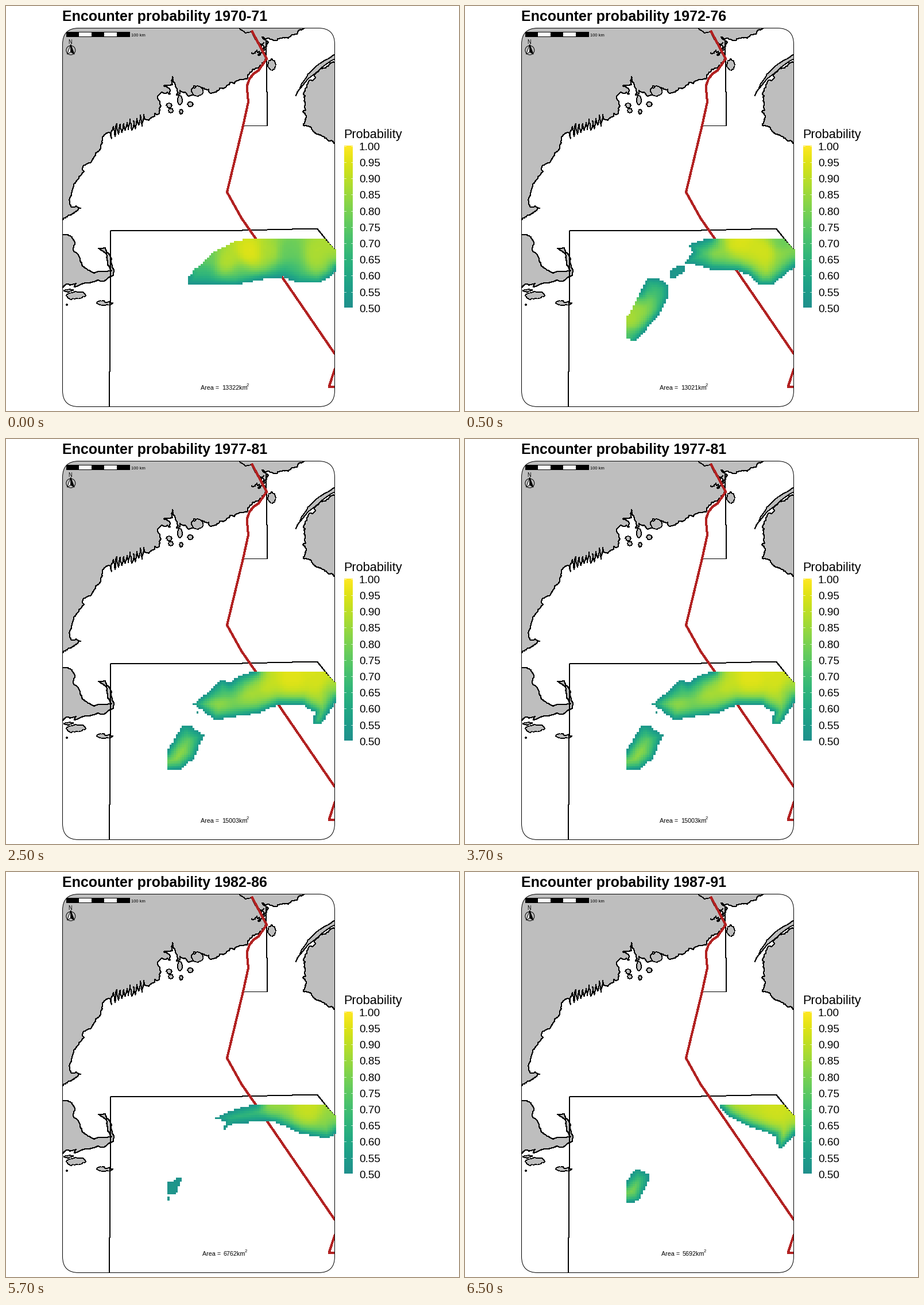
A matplotlib script that plays this animation: 789 px wide and 705 px high, repeating every 8 s.

```python
import numpy as np
import matplotlib.pyplot as plt
from matplotlib.animation import FuncAnimation
from matplotlib.patches import Circle, FancyBboxPatch, Polygon, Rectangle
from matplotlib.path import Path

W, H, DPI = 789, 705, 64
PX = 72 / DPI                      # points per pixel
LAND, ROUTE = "#bebebe", "#b22222"
COLS, ROWS = 81, 52
LEFT, TOP, RIGHT = 281, 405, 575
CELL = (RIGHT - LEFT) / COLS

plt.rcParams["font.family"] = "Liberation Sans"
rng = np.random.default_rng(7)

fig = plt.figure(figsize=(W / DPI, H / DPI), dpi=DPI, facecolor="white")
ax = fig.add_axes([0, 0, 1, 1])
ax.axis("off")

panel = FancyBboxPatch((98.5, 38.5), 474, 659, boxstyle="round,pad=0,rounding_size=28",
                       fc="none", ec="black", lw=PX, zorder=5)
ax.add_patch(panel)


def rough(points, amp, depth=3):
    """Jagged version of a polyline by midpoint displacement."""
    p = np.array(points, float)
    for _ in range(depth):
        d = np.diff(p, axis=0)
        normal = np.column_stack([-d[:, 1], d[:, 0]])
        mid = (p[:-1] + p[1:]) / 2 + normal * rng.normal(0, amp, (len(d), 1))
        out = np.empty((2 * len(p) - 1, 2))
        out[::2], out[1::2] = p, mid
        p = out
    return p


def shape(points, fc=LAND, ec="black", lw=1, aa=False, zorder=1):
    artist = Polygon(points, fc=fc, ec=ec, lw=lw * PX, antialiased=aa, zorder=zorder)
    ax.add_patch(artist)
    artist.set_clip_path(panel)


def island(cx, cy, rx, ry, lean=0):
    t = np.linspace(0, 2 * np.pi, 9)
    x, y = rx * np.cos(t), ry * np.sin(t)
    shape(rough(np.column_stack([cx + x + lean * y, cy + y]), 0.13, 2), lw=0.6)


def line(points, color="black", width=1, zorder=3):
    x, y = zip(*points)
    artist, = ax.plot(x, y, color=color, lw=width * PX, antialiased=False, zorder=zorder,
                      solid_joinstyle="round", solid_capstyle="butt")
    artist.set_clip_path(panel)


def text(x, y, s, size, **kw):
    return ax.text(x, y, s, fontsize=size * PX, va="baseline", zorder=8, **kw)


# Mainland
east = [(518, 30), (517, 40), (498, 50), (483, 55), (468, 60), (453, 57), (446, 54),
        (448, 74), (452, 91), (440, 107), (425, 115), (408, 128), (385, 138), (372, 143),
        (357, 152), (345, 143)]
middle = [(345, 143), (327, 139), (318, 157), (303, 147), (297, 155), (295, 138),
          (290, 123), (290, 137), (275, 139), (286, 153), (276, 152), (267, 178),
          (267, 187), (241, 197)]
west = [(182, 221), (168, 228), (165, 248), (150, 268), (133, 283), (132, 293),
        (118, 313), (110, 338), (113, 349), (130, 352), (109, 364), (98, 373)]
n = 20
reach = np.where(np.arange(n) % 2, 10, -9) * rng.uniform(0.5, 1.2, n)
fingers = np.column_stack([np.linspace(240, 184, n), np.linspace(197, 219, n) + reach])
shape(np.vstack([rough(east, 0.2), rough(middle, 0.18), rough(fingers, 0.06, 2),
                 rough(west, 0.12), [(90, 376), (90, 30)]]))

cape = [(98, 398), (112, 400), (120, 412), (117, 425), (126, 433), (133, 453), (153, 465),
        (184, 461), (177, 450), (174, 430), (161, 422), (173, 421), (181, 434), (188, 460),
        (187, 469), (160, 477), (119, 489), (122, 483), (105, 484), (98, 491)]
shape(np.vstack([rough(cape, 0.08), [(90, 491), (90, 398)]]))

neck = [(580, 80), (540, 105), (515, 135), (505, 156), (520, 134), (545, 112), (580, 88)]
shape(rough(neck, 0.03), lw=0.7)
peninsula = [(580, 88), (549, 109), (529, 129), (518, 153), (517, 184), (522, 196),
             (518, 207), (532, 214), (540, 222), (552, 227), (573, 252), (580, 255)]
shape(rough(peninsula, 0.17, 4))

for spec in [(463, 102, 7, 10, 0.1), (122, 504, 17, 6, -0.4), (172, 517, 14, 4, 0.3),
             (109, 495, 8, 2, -1.5), (106, 520, 1, 1), (333, 148, 10, 9), (303, 164, 4, 8),
             (284, 173, 5, 4), (287, 182, 4, 4), (305, 184, 3, 4), (321, 171, 5, 4)]:
    island(*spec)

# Tidal inlets and the upper river
shape(rough([(444, 66), (449, 64), (452, 75), (447, 80), (444, 66)], 0.25, 2), "white")
line(rough([(428, 81), (437, 77), (439, 85), (445, 81)], 0.4), zorder=2)
line(rough([(406, 38), (417, 47), (428, 45), (444, 70)], 0.12, 2), width=0.7, zorder=2)

# Management areas and the boundary route
line([(453, 61), (455.5, 208.5), (413, 208.5)])
line([(180, 698), (182.5, 391.5), (390, 391), (542, 387.5), (573, 426)])
line([(428, 43), (454, 92), (449, 99), (440, 112), (431, 118), (424, 127), (419.5, 140),
      (422, 167), (413, 208), (385, 324), (410, 369), (435, 405), (573, 606)], ROUTE, 3, 4)
line([(573, 631), (562.5, 663), (573, 663)], ROUTE, 3, 4)

# Scale bar and north arrow
ax.add_patch(Rectangle((105, 45), 110, 8, fc="white", ec="black", lw=PX, aa=False, zorder=6))
for x in (105, 149, 193):
    ax.add_patch(Rectangle((x, 45), 22, 8, fc="black", lw=0, zorder=6))
text(218, 53, "100 km", 7.6)
text(108, 66, "N", 9.5)
ax.add_patch(Circle((112.8, 77), 8, fc="none", ec="black", lw=PX, zorder=6))
for side, fill in ((-6.3, "white"), (6.3, "black")):
    shape([(112.8, 67), (112.8 + side, 84), (112.8, 80)], fill, aa=True, zorder=6)

# Legend
viridis = plt.get_cmap("viridis")
ax.imshow(viridis(np.linspace(1, 0.5, 282))[:, None], extent=(589, 604, 525.5, 243.5),
          aspect="auto", interpolation="nearest", zorder=6)
text(588, 230, "Probability", 21.7)
for i in range(11):
    y = 243.8 + 28.2 * i
    for x in (589, 601):
        ax.plot([x, x + 3], [y, y], color="white", lw=0.7 * PX, zorder=7)
    text(615, y + 7, f"{1 - 0.05 * i:.2f}", 19)

# Probability surfaces
gx, gy = np.meshgrid(LEFT + CELL * (np.arange(COLS) + 0.5), TOP + CELL * (np.arange(ROWS) + 0.5))
cells = np.column_stack([gx.ravel(), gy.ravel()])
CORNER = [(576, 428), (554, 404)]


def distance(points, edge):
    """Distance from each point to the nearest segment of a polyline."""
    a, d = edge[:-1], np.diff(edge, axis=0)
    rel = points[:, None] - a
    t = np.clip((rel * d).sum(axis=2) / (d ** 2).sum(axis=1), 0, 1)
    return np.linalg.norm(rel - t[..., None] * d, axis=2).min(axis=1)


def patch(edge, peaks, width=18, cut=()):
    """Fill edge + cut; values climb from 0.51 at the edge to nearby peaks (x, y, p)."""
    edge, peaks = np.array(edge, float), np.array(peaks, float)
    inside = Path(np.vstack([edge, *[[c] for c in cut]])).contains_points(cells)
    pts = cells[inside]
    r2 = ((pts[:, None] - peaks[:, :2]) ** 2).sum(axis=2)
    weight = (r2 + 300) ** -2.0
    peak = weight @ peaks[:, 2] / weight.sum(axis=1)
    value = np.full(len(cells), np.nan)
    value[inside] = 0.51 + (peak - 0.51) * np.tanh(distance(pts, edge) / width)
    return value.reshape(ROWS, COLS)


def dot(x, y, rows=1):
    value = np.full((ROWS, COLS), np.nan)
    col, row = int((x - LEFT) / CELL), int((y - TOP) / CELL)
    value[row:row + rows, col] = 0.52
    return value


def surface(*parts):
    value = np.fmax.reduce(parts)
    rgba = viridis(np.nan_to_num(value))
    rgba[..., 3] = ~np.isnan(value)
    return rgba


s1970 = surface(patch(
    [(317, 474), (317, 484), (400, 486), (445, 476), (483, 472), (510, 483), (545, 483),
     (567, 470), (576, 458)],
    [(425, 430, .96), (385, 446, .9), (350, 440, .77), (345, 462, .68), (462, 428, .88),
     (488, 428, .76), (545, 432, .88), (490, 458, .7), (405, 466, .78)],
    16, CORNER + [(425, 404), (395, 411), (365, 426), (325, 462)]))

s1972 = surface(
    patch([(425, 404), (389, 416), (396, 428), (382, 450), (398, 449), (430, 459),
           (475, 461), (492, 467), (514, 486), (535, 486), (576, 453)],
          [(475, 412, .95), (520, 430, .94), (410, 428, .74), (440, 430, .85),
           (554, 408, .77), (560, 438, .85)], 18, CORNER),
    patch([(358, 473), (358, 459), (369, 453), (383, 453), (382, 462), (366, 474)],
          [(370, 463, .57)]),
    patch([(297, 585), (342, 532), (354, 505), (354, 486), (339, 475), (317, 474),
           (305, 498)],
          [(290, 550, .89), (305, 532, .86), (316, 510, .8), (328, 495, .68),
           (290, 573, .73)], 13, [(290, 530), (280, 541), (280, 578)]))

s1977 = surface(
    patch([(432, 404), (408, 411), (389, 425), (376, 418), (355, 438), (326, 461),
           (365, 489), (440, 477), (475, 462), (515, 462), (538, 476), (534, 497),
           (549, 497), (576, 455)],
          [(495, 418, .96), (540, 420, .94), (460, 425, .92), (425, 442, .88),
           (370, 463, .87), (375, 438, .73), (405, 425, .76), (568, 442, .87)], 16, CORNER),
    dot(332, 475),
    patch([(280, 577), (305, 574), (328, 555), (345, 515), (319, 498), (307, 498),
           (280, 545)],
          [(300, 545, .88), (312, 526, .82), (318, 510, .66)], 15))

s1982 = surface(
    patch([(433, 404), (393, 415), (364, 429), (383, 435), (376, 450), (395, 439),
           (450, 433), (470, 436), (513, 455), (562, 464), (576, 453)],
          [(525, 416, .92), (475, 412, .86), (420, 418, .72), (565, 432, .84)], 16, CORNER),
    dot(283, 568, 2),
    patch([(280, 562), (280, 542), (296, 536), (299, 529), (306, 535), (298, 555),
           (292, 562)], [(290, 550, .56)]))

s1987 = surface(
    patch([(440, 404), (460, 425), (490, 441), (540, 459), (546, 480), (553, 480),
           (576, 455)],
          [(540, 422, .93), (490, 412, .91), (565, 440, .91)], 14, CORNER),
    patch([(280, 577), (303, 572), (319, 541), (320, 526), (304, 517), (295, 518),
           (280, 541)], [(292, 548, .86), (304, 528, .7)], 15))

periods = [("1970-71", 13322, s1970), ("1972-76", 13021, s1972), ("1977-81", 15003, s1977),
           ("1982-86", 6762, s1982), ("1987-91", 5692, s1987)]

heat = ax.imshow(s1970, extent=(LEFT, RIGHT, TOP + ROWS * CELL, TOP),
                 aspect="auto", interpolation="nearest", zorder=7)
ax.set_xlim(0, W)
ax.set_ylim(H, 0)
title = text(98, 26, "", 25, weight="bold")
label = text(339, 668, "Area =", 10.7)
number = text(376, 668, "", 10.7)
square = text(419, 662, "2", 7.6)


def update(frame):
    years, area, rgba = periods[(frame + 3) // 4]
    inset = 0 if area >= 10000 else 3
    heat.set_data(rgba)
    title.set_text(f"Encounter probability {years}")
    number.set_text(f"{area}km")
    label.set_x(339 + inset)
    number.set_x(376 + inset)
    square.set_x(419 - inset)
    return heat, title, label, number, square


anim = FuncAnimation(fig, update, frames=16, interval=500, repeat=True, blit=False)
plt.show()
```
